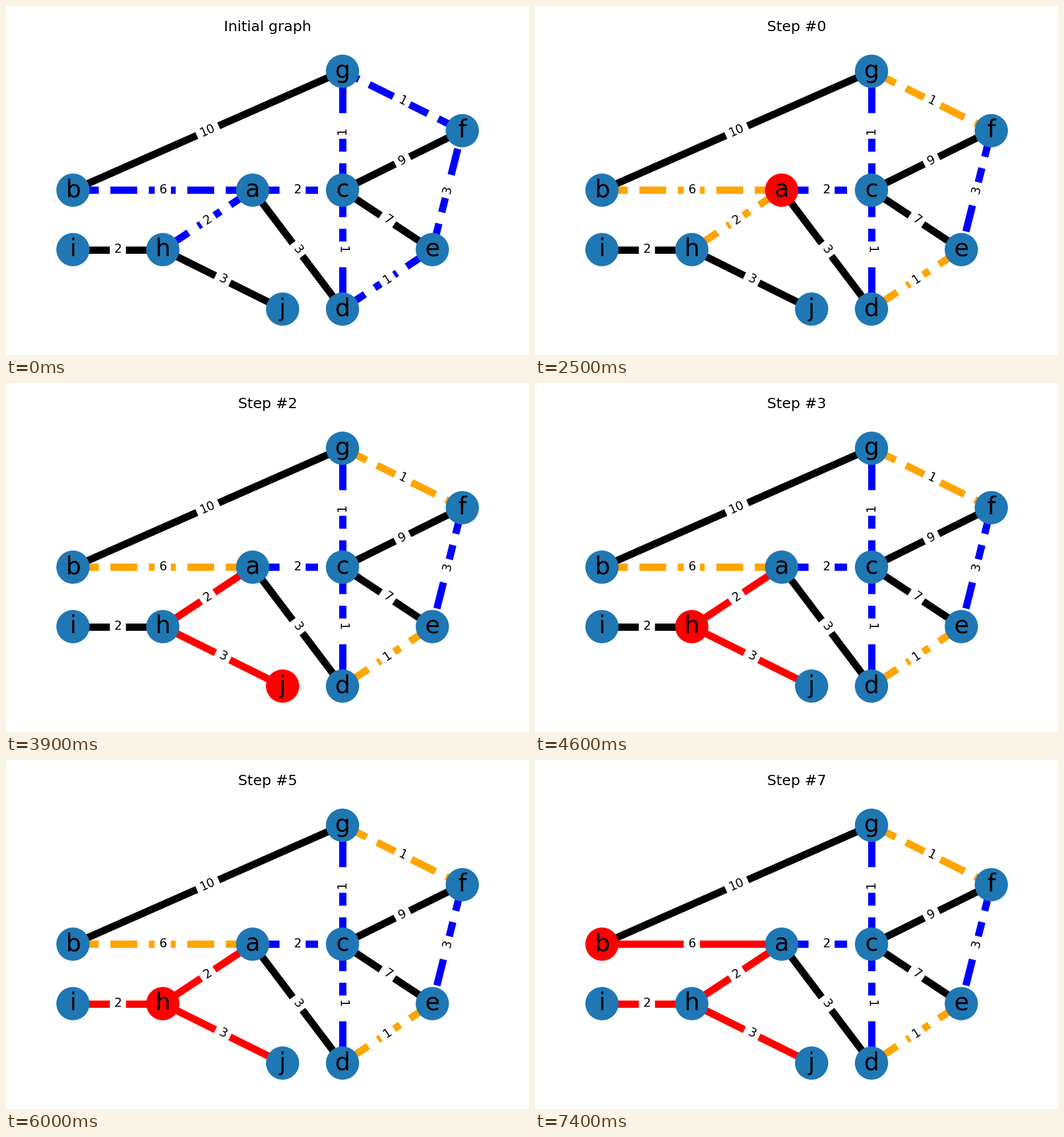
Recreate the animation shown at these times as a matplotlib script. Size 917 by 611 pixels, loop 8000 ms.

```python
import math

import matplotlib.pyplot as plt
from matplotlib.animation import FuncAnimation

WIDTH, HEIGHT = 917, 611
DPI = HEIGHT / 4
INTERVAL, LOOP = 100, 8000
NODE_BLUE = "#1f77b4"

# Grid cells of the nodes: columns from the left, rows from the bottom.
CELLS = {
    "a": (6, 2), "b": (0, 2), "c": (9, 2), "d": (9, 0), "e": (12, 1),
    "f": (13, 3), "g": (9, 4), "h": (3, 1), "i": (0, 1), "j": (7, 0),
}
POS = {n: (117.4 + 52.51 * col, 80.4 + 104.1 * row)
       for n, (col, row) in CELLS.items()}

REQUIRED = {"bg": 10, "cf": 9, "ce": 7, "ad": 3, "hi": 2, "hj": 3}
OPTIONAL = {"ab": 6, "ac": 2, "ah": 2, "cg": 1, "cd": 1,
            "fe": 3, "gf": 1, "ed": 1}
WEIGHTS = {**REQUIRED, **OPTIONAL}
CHOSEN = {"ab", "ah", "gf", "ed"}
# These edges run the other way until the optional ones are chosen.
TURNED = {"fe", "gf", "ed"}

ROUTE = "ahjhihab"
CHOICE_AT, WALK_AT, STEP_TIME = 500, 2500, 700

fig = plt.figure(figsize=((WIDTH + 1e-6) / DPI, HEIGHT / DPI), dpi=DPI,
                 facecolor="white")
ax = fig.add_axes([0, 0, 1, 1])
ax.set_xlim(0, WIDTH)
ax.set_ylim(0, HEIGHT)
ax.axis("off")
plt.rcParams["font.family"] = "DejaVu Sans"


def ends(edge):
    return zip(*(POS[n] for n in edge))


def add_weight(edge, weight):
    (x1, x2), (y1, y2) = ends(edge)
    angle = math.degrees(math.atan2(y2 - y1, x2 - x1))
    if angle > 90:
        angle -= 180
    elif angle < -90:
        angle += 180
    ax.text((x1 + x2) / 2, (y1 + y2) / 2, str(weight), size=10,
            rotation=angle, ha="center", va="center", zorder=1.5,
            bbox=dict(boxstyle="round", ec="white", fc="white"))


lines = {e: ax.plot(*ends(e), lw=6, zorder=1)[0] for e in WEIGHTS}
for edge, weight in WEIGHTS.items():
    add_weight(edge, weight)

nodes = ax.scatter(*zip(*POS.values()), s=700, linewidths=1, zorder=2,
                   c=[NODE_BLUE] * len(POS))
for name, (x, y) in POS.items():
    ax.text(x, y, name, size=20, ha="center", va="center", zorder=3)

title = ax.text(WIDTH / 2, HEIGHT - 44.1, "", size=12, ha="center",
                va="baseline")


def edge_style(edge, chosen, visited):
    if frozenset(edge) in visited:
        return "red", "-"
    if edge in REQUIRED:
        return "black", "-"
    return ("orange" if chosen and edge in CHOSEN else "blue"), "--"


def draw(frame):
    now = frame * INTERVAL
    chosen = now >= CHOICE_AT
    step = (now - WALK_AT) // STEP_TIME if now >= WALK_AT else -1
    path = ROUTE[:step + 1]
    visited = {frozenset(pair) for pair in zip(path, path[1:])}

    if step >= 0:
        title.set_text(f"Step #{step}")
    else:
        title.set_text("Chosen optional edges" if chosen else "Initial graph")

    for edge, line in lines.items():
        color, style = edge_style(edge, chosen, visited)
        turned = not chosen and edge in TURNED
        line.set_data(*ends(edge[::-1] if turned else edge))
        line.set_color(color)
        line.set_linestyle(style)

    current = path[-1:]
    nodes.set_color(["red" if n == current else NODE_BLUE for n in POS])
    return [title, nodes, *lines.values()]


anim = FuncAnimation(fig, draw, frames=LOOP // INTERVAL, interval=INTERVAL,
                     repeat=True, repeat_delay=0, blit=False)
plt.show()
```
